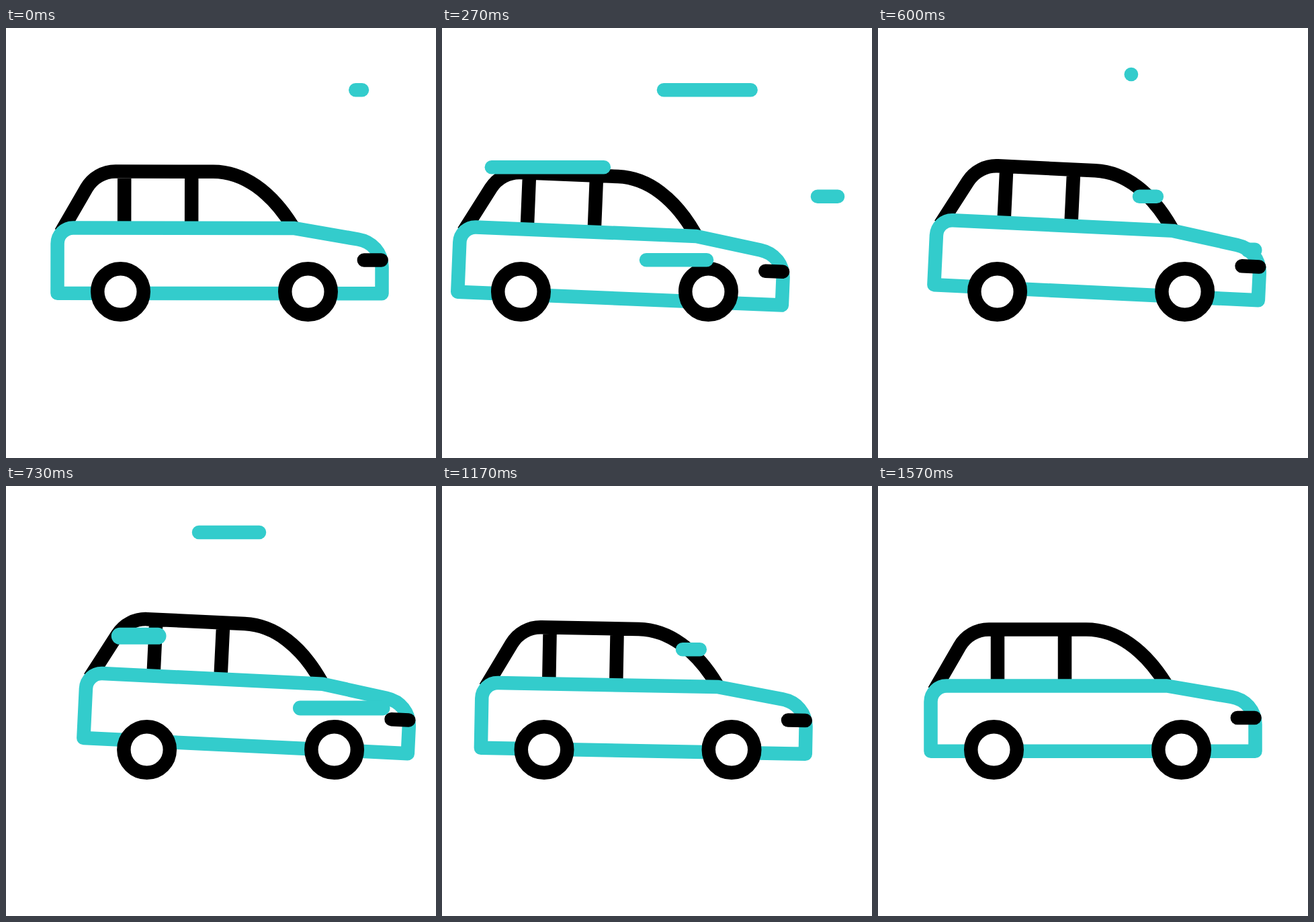
Write an HTML page that moves like this. It is 640 by 640 pixels and loops after 1670 ms.

```html
<!DOCTYPE html>
<html lang="en">
<head>
<meta charset="utf-8">
<title>Driving car</title>
<style>
  html, body { margin: 0; height: 100%; overflow: hidden; background: #fff; }
  svg { display: block; width: 100vw; height: 100vh; }
  path, circle { fill: none; stroke: #000; stroke-width: 20.5; }
  .teal { stroke: #3cc; stroke-linejoin: round; }
  #wheels circle { fill: #fff; }
  #lamp path, #lines path { stroke-linecap: round; }
  #lines path { stroke: #3cc; }
</style>
</head>
<body>
<svg viewBox="0 0 640 640">
  <g id="body">
    <path d="M83.5 304.5 121.6 238.5A50 50 0 0 1 165 213.5H310C355 213.5 396 243 428 294M178 213.5V297M278 213.5V297"/>
    <path class="teal" d="M78.5 394.75V321A23.5 23.5 0 0 1 102 297.5H430L526 314C547 317.5 561.5 334 561.5 355V394.75Z"/>
  </g>
  <g id="wheels">
    <circle cx="172.5" cy="392.5" r="34.25"/>
    <circle cx="451.5" cy="392.5" r="34.25"/>
  </g>
  <g id="lamp"><path d="M534.8 345H560.6"/></g>
  <g id="lines">
    <path data-start="-1" d="M530 92.2h-200"/>
    <path data-start="1" d="M253 207.2h-200"/>
    <path data-start="4" d="M394 345.3h-200"/>
    <path data-start="6" d="M589 250.8h-200"/>
    <path data-start="17" d="M560.5 330.5h-199" style="stroke-width: 22"/>
    <path data-start="18" d="M377 69.1h-200"/>
    <path data-start="19" d="M226 223.3h-196" style="stroke-width: 25"/>
    <path data-start="23" d="M558 243.2h-200"/>
  </g>
</svg>
<script>
const LOOP = 1670, FRAME = 100 / 3;
const $ = id => document.getElementById(id);
const lines = [...$("lines").children];
lines.forEach(line => line.setAttribute("pathLength", 1));

// Eased progress from 0 to 1 between two times, in frames
function ease(n, from, to) {
  const x = Math.min(1, Math.max(0, (n - from) / (to - from)));
  return x * x * (3 - 2 * x);
}

function drawCar(n) {
  // The car drops back, surges forward, overshoots and settles
  const shift = -58.5 * ease(n, -1, 9.8) + 100 * ease(n, 9.8, 24)
    - 62 * ease(n, 24, 35) + 20.5 * ease(n, 35, 47);
  const lift = 9.9 * ease(n, -1, 12) - 18.3 * ease(n, 12, 23) + 8.4 * ease(n, 24, 37);
  const tilt = 2.74 * (ease(n, -1, 11) - ease(n, 26, 42));
  const pose = `translate(${shift} ${lift}) rotate(${tilt} 320 385)`;
  $("body").setAttribute("transform", pose);
  $("lamp").setAttribute("transform", pose);
  $("wheels").setAttribute("transform", `translate(${shift} 0)`);
}

function drawLine(line, n) {
  const age = n - line.dataset.start;
  const head = ease(age, 0, 9), tail = ease(age, 6, 14);
  line.style.display = head > tail ? "" : "none";
  line.style.strokeDasharray = `${head - tail} 2`;
  line.style.strokeDashoffset = -tail;
}

const began = performance.now();
function tick() {
  const ms = (performance.now() - began) % LOOP;
  const n = Math.floor((ms + 5) / FRAME) + 0.2;
  drawCar(n);
  lines.forEach(line => drawLine(line, n));
  requestAnimationFrame(tick);
}
tick();
</script>
</body>
</html>
```
